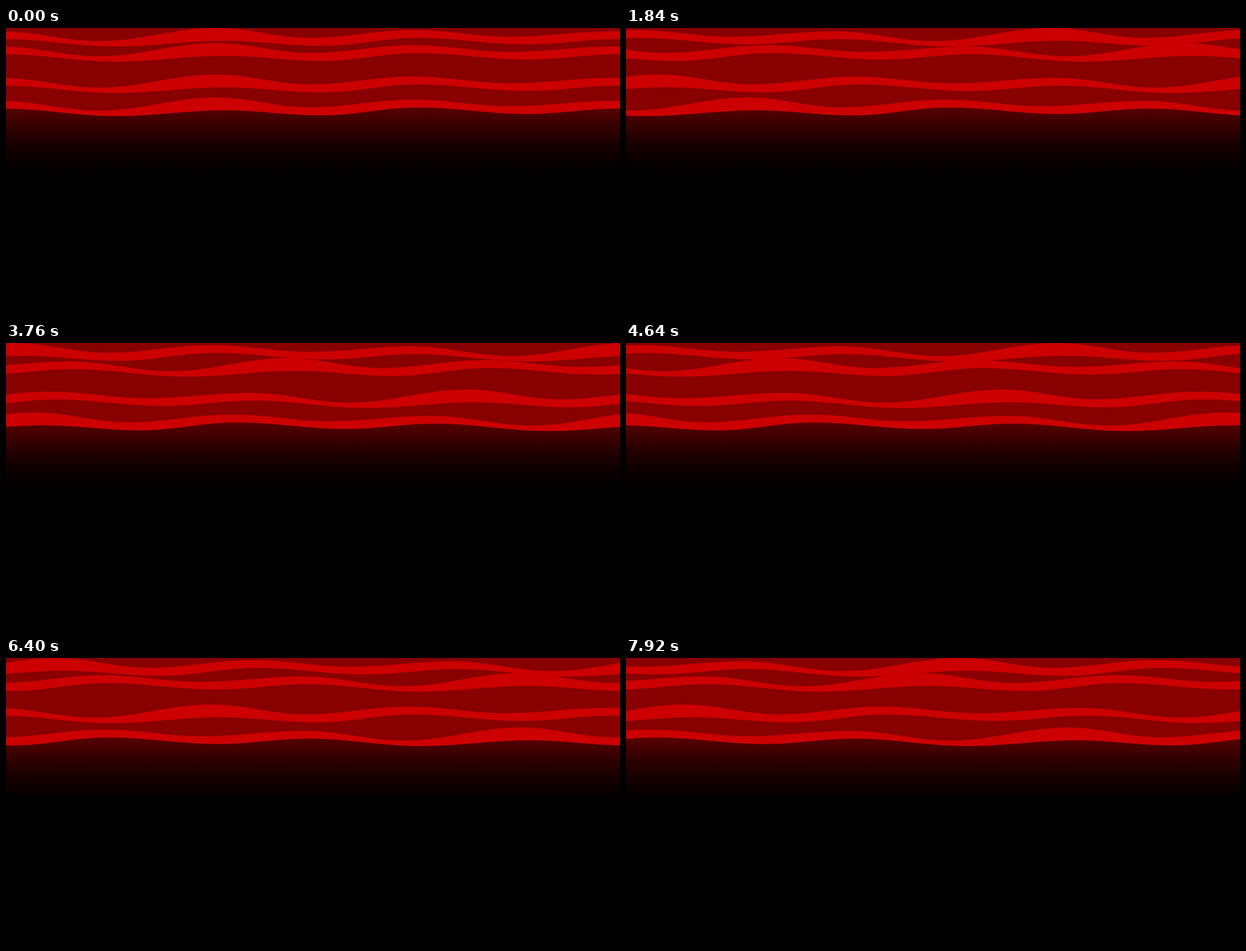
Write an HTML page with a canvas that moves like this. It is 1093 px wide and 512 px high and loops after 8 s.

```html
<!DOCTYPE html>
<html lang="en">
<head>
<meta charset="utf-8">
<title>Red waves</title>
<style>
  html, body { margin: 0; width: 100%; height: 100%; overflow: hidden; background: #000; }
  canvas { display: block; width: 100%; height: 100%; }
</style>
</head>
<body>
<canvas id="stage" width="1093" height="512"></canvas>
<script>
const W = 1093, H = 512, LOOP = 8000, STEP = 80;
const GLOW_TOP = 140, GLOW_HEIGHT = 130, GLOW_RED = 92;
const ctx = document.getElementById('stage').getContext('2d');

// A wave edge runs through its troughs and crests [x, y] in half cosines.
function waveEdge(...points) {
  const [x0, y0] = points[0];
  const knots = [...points, [x0 + W, y0]];
  return x => {
    const u = x0 + (((x - x0) % W) + W) % W;
    const k = knots.findIndex(p => p[0] > u);
    const [ax, ay] = knots[k - 1], [bx, by] = knots[k];
    return ay + (by - ay) * (1 - Math.cos(Math.PI * (u - ax) / (bx - ax))) / 2;
  };
}

const upper = waveEdge([166, 23.3], [374, 0], [541, 17.5], [725, 3.7], [898, 15.5], [1082, 6]);
const lower = waveEdge([195, 33], [390, 22.8], [562, 31.8], [733, 17.7], [928, 29.3], [1089, 19.8]);

// Every band is the same wave; "period" is the time to travel one stage width.
const bands = [
  { y: 0, period: 2829 },
  { y: 27, period: 4250 },
  { y: 83, period: 6350 },
  { y: 124, period: 12700 }
];

const glow = ctx.createLinearGradient(0, GLOW_TOP, 0, GLOW_TOP + GLOW_HEIGHT);
for (let u = 0; u <= 1; u += 1 / 16) {
  glow.addColorStop(u, `rgb(${Math.round(GLOW_RED * (1 - u) ** 1.7)},0,0)`);
}

function fillBetween(above, below, color) {
  ctx.beginPath();
  for (let x = 0; x <= W; x++) ctx.lineTo(x, above(x));
  for (let x = W; x >= 0; x--) ctx.lineTo(x, below(x));
  ctx.fillStyle = color;
  ctx.fill();
}

function draw(time) {
  const t = Math.floor((time % LOOP) / STEP) * STEP;
  const place = (edge, { y, period }) => x => y + edge(x + W * t / period);

  ctx.fillStyle = glow;
  ctx.fillRect(0, 0, W, H);
  fillBetween(() => 0, place(lower, bands[bands.length - 1]), '#880000');
  for (const band of bands) {
    fillBetween(place(upper, band), place(lower, band), '#cc0000');
  }
}

const start = performance.now();
function tick() {
  draw(performance.now() - start);
  requestAnimationFrame(tick);
}
tick();
</script>
</body>
</html>
```
